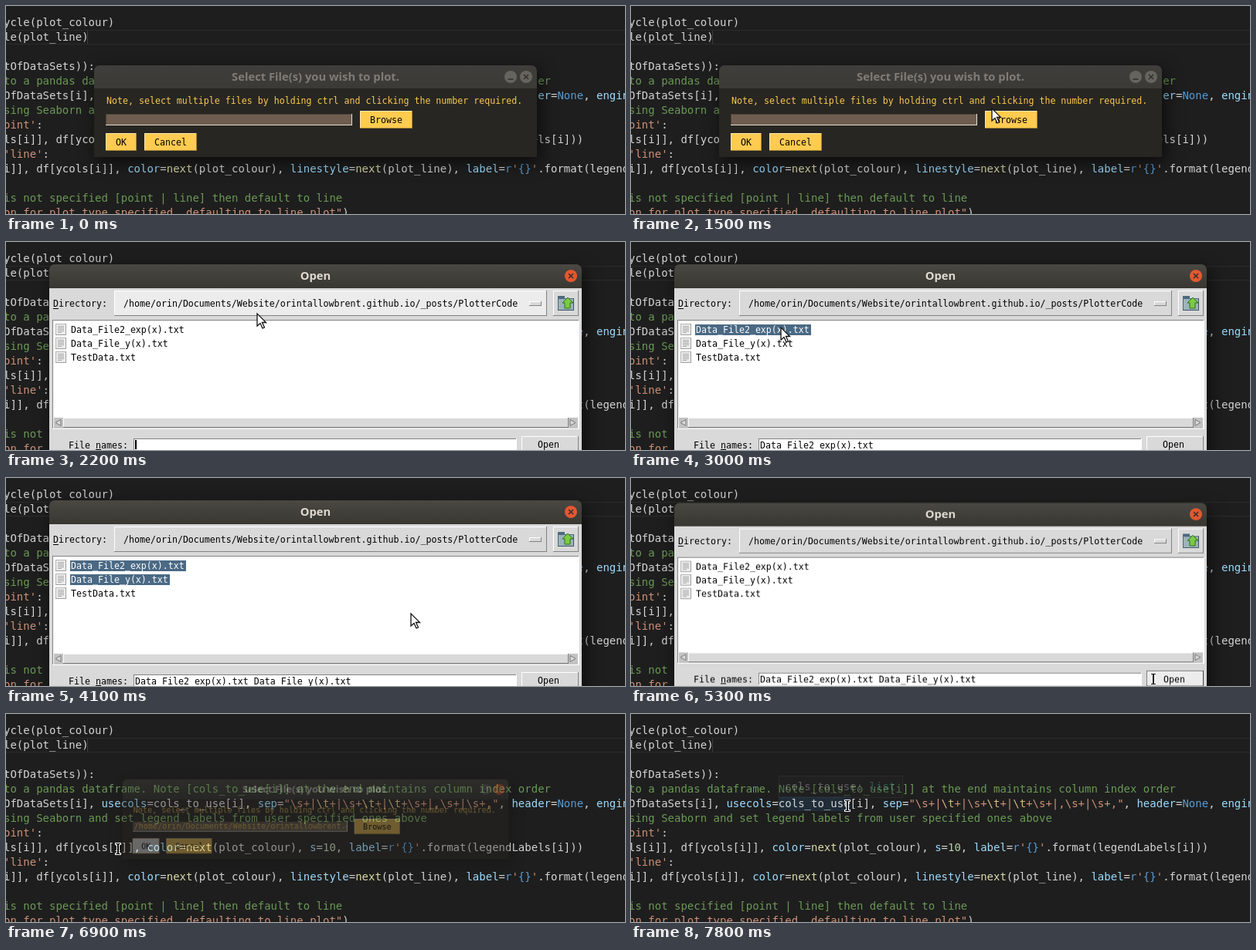
An HTML page with a canvas that plays this animation: 801 px wide and 270 px high, repeating every 8 s.

```html
<!DOCTYPE html>
<html lang="en">
<head>
<meta charset="utf-8">
<title>Selecting files to plot</title>
<style>
html, body { margin: 0; width: 100%; height: 100%; overflow: hidden; background: #1e1e1e; }
canvas { display: block; }
</style>
</head>
<body>
<canvas width="801" height="270"></canvas>
<script>
const stage = document.querySelector('canvas').getContext('2d');
const layer = document.createElement('canvas').getContext('2d');
layer.canvas.width = 801;
layer.canvas.height = 340;
let ctx = stage;

const LOOP = 8000, STEP = 100;
const CODE_FONT = '14px "DejaVu Sans Mono", monospace';
const UI_FONT = '11.627px "DejaVu Sans Mono", monospace';
const TITLE_FONT = 'bold 14.75px "Open Sans", sans-serif';
const PATH = '/home/orin/Documents/Website/orintallowbrent.github.io/_posts/PlotterCode';
const FILES = ['Data_File2_exp(x).txt', 'Data_File_y(x).txt', 'TestData.txt'];

// "~x" switches to colour x
const COLORS = {
  w: '#d4d4d4', g: '#6a9955', s: '#ce9178', b: '#9cdcfe', f: '#dcdcaa',
  k: '#569cd6', n: '#b5cea8', e: '#d7ba7d', t: '#4ec9b0',
};
const LABEL = `~blabel~w=~kr~s'~k{}~s'~w.format(legendLabels[i]))`;
const COLOR = '~bcolor~w=~fnext~w(plot_colour), ';
const LINES = [
  '~wycle(plot_colour)',
  '~wle(plot_line)',
  '',
  '~wtOfDataSets)):',
  '~gto a pandas dataframe. Note [cols_to_use[i]] at the end maintains column index order',
  String.raw`~wOfDataSets[i], ~busecols~w=cols_to_use[i], ~bsep~w=~s"\s+|~e\t~s+|\s+~e\t~s+|~e\t~s+\s+|,\s+|\s+,"~w, ~bheader~w=~kNone~w, ~bengine`,
  '~gsing Seaborn and set legend labels from user specified ones above',
  `~soint'~w:`,
  `~wls[i]], df[ycols[i]], ${COLOR}~bs~w=~n10~w, ${LABEL}`,
  `~s'line'~w:`,
  `~wi]], df[ycols[i]], ${COLOR}~blinestyle~w=~fnext~w(plot_line), ${LABEL}`,
  '',
  '~gis not specified [point | line] then default to line',
  '~son for plot type specified, defaulting to line plot"~w)',
];

// pointer moves: first step, last step, x, y
const MOVES = [
  [800, 1100, 467, 133], [1900, 2000, 440, 88], [2200, 2300, 209, 97],
  [2500, 2700, 194, 111], [3200, 3300, 189, 124], [3700, 3800, 435, 147],
  [4100, 4100, 524, 176], [4300, 4900, 676, 261], [5700, 6100, 197, 159],
  [6300, 6500, 148, 169], [6900, 6900, 145, 175], [7300, 7400, 280, 119],
];

function pointerAt(t) {
  let x = 453, y = 76;
  for (const [from, to, tx, ty] of MOVES) {
    if (t < from) break;
    const k = Math.min(1, (t - from + STEP) / (to - from + STEP));
    x += (tx - x) * k;
    y += (ty - y) * k;
  }
  return { x, y };
}

const clamp = v => Math.max(0, Math.min(1, v));
const easeOut = v => 1 - (1 - clamp(v)) ** 2;
const inside = (p, x, y, w, h) => p.x >= x && p.x < x + w && p.y >= y && p.y < y + h;

// draws a group as one picture, scaled about the given height and faded as a whole
function composite(alpha, scaleX, scaleY, centerY, draw) {
  ctx = layer;
  ctx.clearRect(0, 0, 801, 340);
  draw();
  ctx = stage;
  ctx.save();
  ctx.globalAlpha = alpha;
  ctx.translate(400.5, centerY);
  ctx.scale(scaleX, scaleY);
  ctx.drawImage(layer.canvas, -400.5, -centerY);
  ctx.restore();
}

function rect(x, y, w, h, color) {
  ctx.fillStyle = color;
  ctx.fillRect(x, y, w, h);
}

function text(str, x, y, color = '#000', font = UI_FONT, align = 'left') {
  ctx.font = font;
  ctx.textAlign = align;
  ctx.fillStyle = color;
  ctx.fillText(str, x, y);
}

function bevel(x, y, w, h, fill, light = '#fff', dark = '#828282') {
  rect(x, y, w, h, dark);
  rect(x, y, w - 1, h - 1, light);
  rect(x + 1, y + 1, w - 2, h - 2, fill);
}

function polygon(x, y, points, fill, stroke) {
  ctx.beginPath();
  points.forEach(([dx, dy]) => ctx.lineTo(x + dx, y + dy));
  ctx.closePath();
  ctx.fillStyle = fill;
  ctx.strokeStyle = stroke;
  ctx.fill();
  ctx.stroke();
}

function richText(line, x, y) {
  const parts = line.split(/~(.)/);
  for (let i = 1; i < parts.length; i += 2) {
    text(parts[i + 1], x, y, COLORS[parts[i]], CODE_FONT);
    x += ctx.measureText(parts[i + 1]).width;
  }
}

function drawEditor(t) {
  rect(0, 0, 801, 270, '#1e1e1e');
  ctx.strokeStyle = '#2b2b2b';
  ctx.strokeRect(-1, 31.5, 804, 18);
  rect(105, 32, 1, 17, '#3c3c3c');
  if (t >= 7800) rect(191, 107, 93, 19, 'rgba(38,79,120,.3)');
  LINES.forEach((line, i) => richText(line, -3, 26 + i * 19));
  if (t >= 7800) {
    composite(0.35, 1, 1, 0, () => {
      bevel(191, 80, 161, 29, '#252526', '#454545', '#454545');
      richText('~wcols_to_use: ~tlist', 199, 99);
    });
  }
}

function titleButton(x, y, color, close) {
  ctx.fillStyle = color;
  ctx.beginPath();
  ctx.arc(x, y, 8, 0, 7);
  ctx.fill();
  ctx.strokeStyle = '#33312d';
  ctx.lineWidth = 1.6;
  ctx.beginPath();
  if (close) {
    ctx.moveTo(x - 3, y - 3); ctx.lineTo(x + 3, y + 3);
    ctx.moveTo(x + 3, y - 3); ctx.lineTo(x - 3, y + 3);
  } else {
    ctx.moveTo(x - 3.5, y + 3); ctx.lineTo(x + 3.5, y + 3);
  }
  ctx.stroke();
  ctx.lineWidth = 1;
}

function windowFrame(x, y, w, h, bar, body, title, focused) {
  ctx.save();
  ctx.shadowColor = 'rgba(0,0,0,.6)';
  ctx.shadowBlur = 22;
  ctx.shadowOffsetX = 4;
  ctx.shadowOffsetY = 7;
  const shade = ctx.createLinearGradient(0, y, 0, y + bar);
  shade.addColorStop(0, focused ? '#4a4842' : '#3f3e3a');
  shade.addColorStop(1, focused ? '#383732' : '#3b3a36');
  ctx.fillStyle = shade;
  ctx.beginPath();
  ctx.roundRect(x, y, w, h, [7, 7, 0, 0]);
  ctx.fill();
  ctx.restore();
  rect(x, y + bar, w, h - bar, body);
  text(title, 400.5, y + 20, focused ? '#dfdbd2' : '#7f7c76', TITLE_FONT, 'center');
  titleButton(x + w - 14, y + 15, focused ? '#e3582f' : '#66645e', true);
}

function drawPlotDialog(t, p) {
  const reachable = t < 2000 || t >= 5700;
  const button = (label, x, y, w) => {
    const hot = reachable && inside(p, x, y, w, 23);
    bevel(x, y, w, 23, hot ? '#ececec' : '#ffcb50', '#ffe9b0', '#a88531');
    text(label, x + w / 2, y + 16, '#000', UI_FONT, 'center');
  };
  windowFrame(114, 77, 573, 119, 30, '#272622', 'Select File(s) you wish to plot.', t >= 5400);
  titleButton(653, 92, '#66645e', false);
  text('Note, select multiple files by holding ctrl and clicking the number required.', 130, 127, '#fbc850');
  button('Browse', 458, 136, 68);
  button('OK', 129, 165, 40);
  button('Cancel', 179, 165, 68);
  bevel(129, 140, 319, 15, '#6f5e50', '#4c4036', '#e6ddd2');
  if (t >= 5700) {
    ctx.save();
    ctx.beginPath();
    ctx.rect(130, 141, 317, 13);
    ctx.clip();
    text(PATH, 131, 151, '#fbc850');
    ctx.restore();
  }
}

function fileIcon(x, y) {
  bevel(x, y, 14, 15, '#ececec', '#b4b4b4', '#a0a0a0');
  for (let i = 0; i < 5; i++) rect(x + 3, y + 3 + i * 2, i === 4 ? 5 : 8, 1, '#a8a8a8');
}

function folderIcon(x, y) {
  rect(x, y, 9, 4, '#4d6a7c');
  bevel(x, y + 3, 21, 16, '#9db3bb', '#4d6a7c', '#3d5665');
  polygon(x, y, [[13, 2], [20, 9], [16, 9], [16, 16], [9, 16], [9, 9], [6, 9]], '#7ccb45', '#2f6e14');
}

function scrollArrow(x, dir) {
  polygon(x, 234.5, [[-3 * dir, -4], [4 * dir, 0], [-3 * dir, 4]], '#d9d9d9', '#777');
}

function drawFileList(selected) {
  bevel(60, 101, 682, 142, '#fff', '#828282', '#fff');
  rect(62, 228, 678, 14, '#c3c3c3');
  bevel(74, 228, 654, 13, '#d9d9d9');
  scrollArrow(68, -1);
  scrollArrow(733, 1);
  FILES.forEach((name, i) => {
    const y = 107 + i * 18;
    fileIcon(64, y - 1);
    if (i < selected) rect(83, y, name.length * 7 + 3, 14, '#4a6984');
    text(name, 84, y + 11, i < selected ? '#fff' : '#000');
  });
  text('File names:', 81, 268);
  rect(116, 269, 7, 1, '#000');
  text('Files of type:', 60, 291);
}

function drawOpenDialog(t, p) {
  const gray = '#d9d9d9';
  const fill = (...box) => t >= 2000 && inside(p, ...box) ? '#ececec' : gray;
  const chosen = t >= 3400 ? 2 : t >= 3000 ? 1 : 0;
  windowFrame(56, 29, 689, 273, 31, gray, 'Open', true);

  text('Directory:', 61, 84);
  rect(61, 86, 7, 1, '#000');
  bevel(140, 63, 560, 33, fill(140, 63, 560, 33));
  text(PATH, 152, 84);
  bevel(677, 77, 16, 6, gray);
  bevel(708, 63, 33, 33, fill(708, 63, 33, 33));
  folderIcon(714, 70);

  if (t >= 1900) drawFileList(t < 5300 ? chosen : 0);
  bevel(165, 255, 496, 17, '#fff', '#828282', '#fff');
  if (t < 1900) rect(166, 256, 494, 15, gray);
  text(FILES.slice(0, chosen).join(' '), 167, 268);
  if (t < 2600) rect(167, 257, 2, 12, '#000');

  const pressed = t >= 4900 ? 1 : 0;
  bevel(667, 252, 74, 21, fill(667, 252, 74, 21));
  if (pressed) {
    ctx.setLineDash([1, 1]);
    ctx.strokeStyle = '#000';
    ctx.strokeRect(667.5, 252.5, 73, 21);
    ctx.setLineDash([]);
  }
  text('Open', 688 + pressed, 267 + pressed);
  bevel(164, 277, 498, 20, gray);
  text('ALL Files (*,*)', 176, 291);
  bevel(642, 284, 16, 6, gray);
  bevel(667, 276, 74, 21, gray);
  text('Cancel', 681, 291);
}

function drawWindows(t, p) {
  const gone = easeOut((t - 6800) / 250);
  if (gone < 1) {
    const scale = 1 - gone * 0.2;
    composite(1 - gone, scale, scale, 136.5, () => drawPlotDialog(t, p));
  }
  if (t >= 1700 && t < 5700) {
    const opening = easeOut((t - 1700) / 260);
    const height = t < 5300 ? opening : t < 5400 ? 0.975 : 0.12;
    composite(opening, 1, height, 165.5, () => drawOpenDialog(t, p));
  }
}

function drawPointer(t, { x, y }) {
  if (t < 600) return;
  ctx.save();
  ctx.translate(Math.round(x), Math.round(y));
  const overDialog = inside({ x, y }, 114, 77, 573, 119);
  if (t >= 6900 || (t >= 5300 && !overDialog)) {
    for (const [grow, color] of [[1, '#fff'], [0, '#000']]) {
      for (const [bx, by, w, h] of [[-1, -6, 2, 13], [-3, -7, 6, 1], [-3, 6, 6, 1]])
        rect(bx - grow, by - grow, w + 2 * grow, h + 2 * grow, color);
    }
  } else {
    ctx.lineWidth = 1.3;
    polygon(0, 0, [[0, 0], [0, 16], [4, 12.5], [7, 19], [9.5, 18], [6.5, 11.5], [11.5, 11.5]], '#fff', '#111');
  }
  ctx.restore();
}

function frame() {
  const t = Math.floor(performance.now() % LOOP / STEP) * STEP;
  const pointer = pointerAt(t);
  drawEditor(t);
  drawWindows(t, pointer);
  drawPointer(t, pointer);
  requestAnimationFrame(frame);
}
frame();
</script>
</body>
</html>
```
